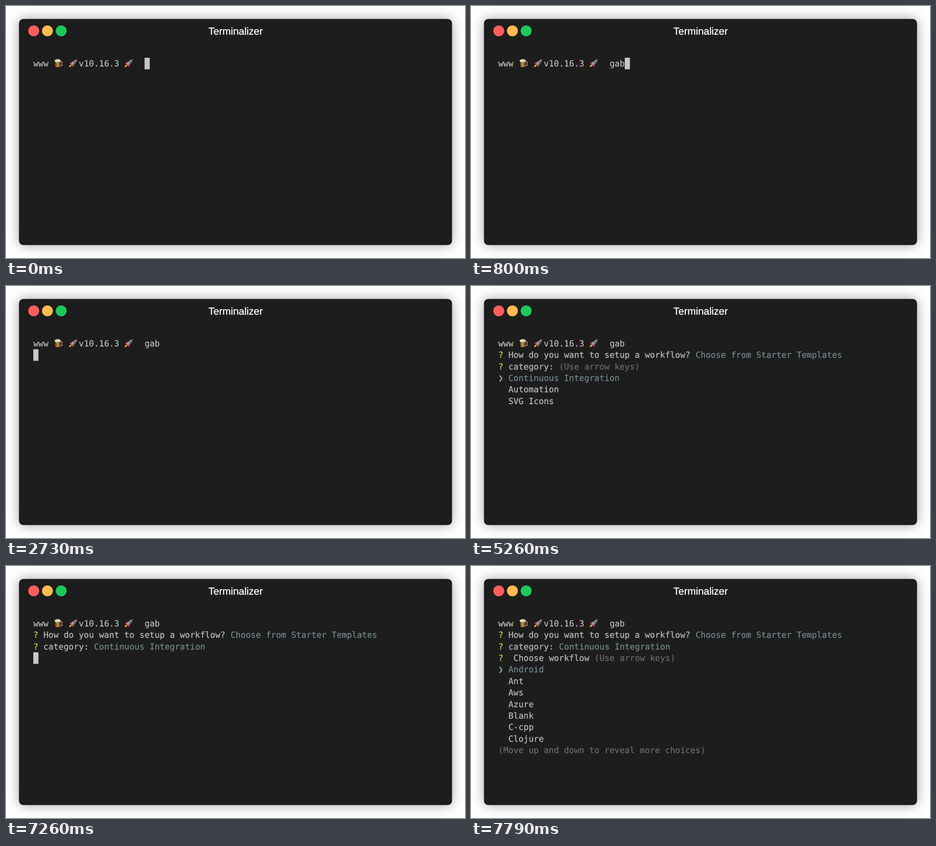
These frames come from a looping animation (1009x555 px, 8 s). An HTML page:

```html
<!DOCTYPE html>
<html lang="en">
<head>
<meta charset="utf-8">
<title>Terminal</title>
<style>
  html, body { margin: 0; width: 100%; height: 100%; overflow: hidden; background: #fff; }
  svg { position: absolute; left: 0; top: 0; display: block; }
  text { white-space: pre; text-rendering: geometricPrecision; }
  .shadow { opacity: .35; filter: blur(14px); }
  .title {
    font: 22.2px "Liberation Sans", Arial, sans-serif; text-anchor: middle;
    fill: #fff; stroke: #fff; stroke-width: .35px;
  }
  .term { font: 18.47px "DejaVu Sans Mono", monospace; stroke-width: .25px; }
</style>
</head>
<body>
<svg width="1009" height="555" viewBox="0 0 1009 555">
  <defs>
    <rect id="window" x="28.5" y="28.5" width="952" height="498" rx="9.5"/>
    <linearGradient id="ale">
      <stop offset="0" stop-color="#93592a"/>
      <stop offset=".5" stop-color="#d39c4c"/>
      <stop offset="1" stop-color="#7c4a24"/>
    </linearGradient>
    <g id="mug">
      <path d="M12 6h3.5q1.6 0 1.6 1.8v5q0 1.8-1.8 1.8H12" fill="none" stroke="#a99a88" stroke-width="1.7"/>
      <path d="M2 4H13L12.6 17Q7.5 19 2.5 17Z" fill="url(#ale)"/>
      <path d="M5 8V16M9.5 8V16" stroke="#6f3f1d" stroke-width=".9"/>
      <path d="M.8 5Q0 1.5 3.5 1.6Q5-.4 7.5.8Q11-.4 12 1.7Q14.8 2 13.8 5.2Q12.5 7 10.8 5.8Q8.5 7.6 6.8 6Q4.6 8.4 3.2 6.3Q1.3 6.8.8 5Z" fill="#e0d6c7"/>
    </g>
    <g id="rocket">
      <path d="M5.5 11.5Q1.5 13 .5 18Q5.5 17.2 7.5 13.7Z" fill="#f39a32"/>
      <path d="M5.6 12.8Q3.4 14 2.5 16.3Q5 15.4 6.6 13.6Z" fill="#ffe184"/>
      <path d="M8 6.5Q3.5 6 1.2 10.8L5.8 10.5ZM12.6 11Q13 15.3 8.4 18L8.3 13.3Z" fill="#c9392f"/>
      <path d="M5 11.5Q8.4 3.2 18.7.4Q16.4 10.2 7.6 14Z" fill="#aeb4b9"/>
      <path d="M7.6 14Q16.4 10.2 18.7.4L6.3 12.7Z" fill="#7d858b"/>
      <path d="M14.4 2Q16.4 1 18.7.4Q18.2 2.8 17.2 4.8Z" fill="#cf4137"/>
      <circle cx="12.6" cy="6.3" r="1.8" fill="#394854"/>
      <path d="M4.8 11.2L8 14.2L6.8 15L4 12.2Z" fill="#8b2d29"/>
    </g>
  </defs>
  <use href="#window" class="shadow"/>
  <use href="#window" fill="#1d1d1d"/>
  <circle cx="61" cy="54.7" r="12" fill="#ff5d5b"/>
  <circle cx="91.1" cy="54.7" r="12" fill="#ffbb52"/>
  <circle cx="121.3" cy="54.7" r="12" fill="#1ec95c"/>
  <text class="title" x="504.8" y="63.1">Terminalizer</text>
  <use href="#mug" x="106.3" y="116.7"/>
  <use href="#rocket" x="137.8" y="116.8"/>
  <use href="#rocket" x="260" y="116.8"/>
  <g class="term" id="screen"></g>
  <rect id="cursor" width="11.3" height="25.4" fill="#c7c7c7"/>
</svg>
<script>
const LOOP = 8000;
const LEFT = 60, TOP = 114, CELL = 11.12, ROW = 25.36, BASE = 19;
const FG = '#bcbcbc', DIM = '#6a6a6a', CYAN = '#74888c', GREEN = '#b3e33b';
const HINT = '(Use arrow keys)';
const screen = document.getElementById('screen');
const cursor = document.getElementById('cursor');

// A run is [column, text, colour]; a line is a list of runs.
const prompt = typed => [[0, 'www', FG], [9, 'v10.16.3', FG], [22, typed, FG]];
const ask = (label, answer, color = CYAN, mark = GREEN, col = 2) =>
  [[0, '?', mark], [col, label, FG], [col + label.length + 1, answer, color]];
const menu = items => items.map((item, i) =>
  i ? [[2, item, FG]] : [[0, '❯', '#93a1a4'], [2, item, CYAN]]);

const setup = 'How do you want to setup a workflow?';
const starters = 'Choose from Starter Templates';
const integration = 'Continuous Integration';
const ran = prompt('gab');
const answered = mark => [ran, ask(setup, starters, CYAN, mark)];
const categorised = [...answered(GREEN), ask('category:', integration)];

const typing = (at, typed) => ({ at, lines: [prompt(typed)], caret: [22 + typed.length, 0] });

const scenes = [
  typing(0, ''),
  typing(500, 'g'),
  typing(660, 'ga'),
  typing(800, 'gab'),
  { at: 2730, lines: [ran], caret: [0, 1] },
  { at: 3420, lines: [
    ran, ask(setup, HINT, DIM, '#dcc23e'),
    ...menu([starters, 'Copy existing workflow', 'Setup a Custom Workflow'])
  ] },
  { at: 5260, lines: [
    ...answered('#c4d83c'), ask('category:', HINT, DIM, '#c4d83c'),
    ...menu([integration, 'Automation', 'SVG Icons'])
  ] },
  { at: 7260, lines: categorised, caret: [0, 3] },
  { at: 7790, lines: [
    ...categorised, ask('Choose workflow', HINT, DIM, GREEN, 3),
    ...menu(['Android', 'Ant', 'Aws', 'Azure', 'Blank', 'C-cpp', 'Clojure']),
    [[0, '(Move up and down to reveal more choices)', DIM]]
  ] }
];

function addRun([col, str, color], row) {
  const el = document.createElementNS('http://www.w3.org/2000/svg', 'text');
  el.setAttribute('x', LEFT + col * CELL);
  el.setAttribute('y', TOP + row * ROW + BASE);
  el.setAttribute('fill', color);
  el.setAttribute('stroke', color);
  el.textContent = str;
  screen.append(el);
}

function draw({ lines, caret }) {
  screen.replaceChildren();
  lines.forEach((line, row) => line.forEach(run => addRun(run, row)));
  cursor.style.display = caret ? '' : 'none';
  if (caret) {
    cursor.setAttribute('x', LEFT + caret[0] * CELL);
    cursor.setAttribute('y', TOP + caret[1] * ROW);
  }
}

let shown;
const start = performance.now();
function update(now) {
  const t = Math.max(0, now - start) % LOOP;
  const scene = scenes.findLast(s => s.at <= t);
  if (scene !== shown) draw(shown = scene);
  requestAnimationFrame(update);
}
update(start);
</script>
</body>
</html>
```
